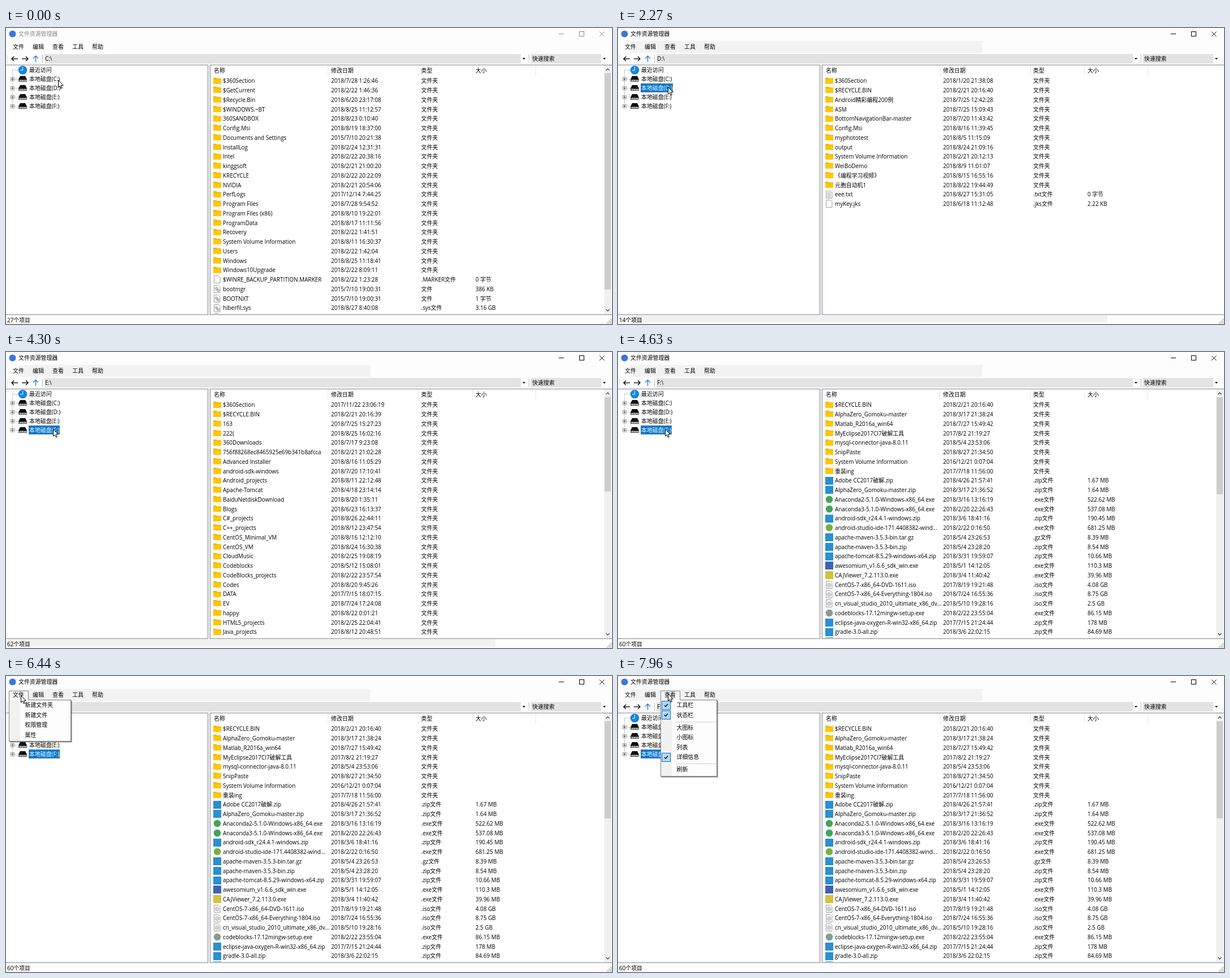
An HTML page with a canvas for the animation above (8000 ms loop, 1070x524 px).

```html
<!DOCTYPE html>
<html lang="zh-CN">
<head>
<meta charset="utf-8">
<title>文件资源管理器</title>
<style>
html, body { margin: 0; width: 100%; height: 100%; overflow: hidden; background: #fdfdfd; }
canvas { display: block; }
</style>
</head>
<body>
<canvas id="stage" width="1070" height="524"></canvas>
<script>
const g = document.getElementById('stage').getContext('2d');
const LOOP = 8000, ROW = 16.75, BLUE = '#0078d7', HOVER = '#b3d7f3';

// Each row: name|date for folders, name|date|extension|size|icon for files
const parse = text => text.trim().split('\n').map(row => row.split('|'));
const DRIVES = {
  C: { count: 27, thumb: 383, rows: parse(`
$360Section|2018/7/28 1:26:46
$GetCurrent|2018/2/22 1:46:36
$Recycle.Bin|2018/6/20 23:17:08
$WINDOWS.~BT|2018/8/25 11:12:57
360SANDBOX|2018/8/23 0:10:40
Config.Msi|2018/8/19 18:37:00
Documents and Settings|2015/7/10 20:21:38
InstallLog|2018/2/24 12:31:31
Intel|2018/2/22 20:38:16
kinggsoft|2018/2/21 21:00:20
KRECYCLE|2018/2/22 20:22:09
NVIDIA|2018/2/21 20:54:06
PerfLogs|2017/12/14 7:44:25
Program Files|2018/7/28 9:54:52
Program Files (x86)|2018/8/10 19:22:01
ProgramData|2018/8/17 11:11:56
Recovery|2018/2/22 1:41:51
System Volume Information|2018/8/11 16:30:37
Users|2018/2/22 1:42:04
Windows|2018/8/25 11:18:41
Windows10Upgrade|2018/2/22 8:09:11
$WINRE_BACKUP_PARTITION.MARKER|2018/2/22 1:23:28|.MARKER|0 字节|page
bootmgr|2015/7/10 19:00:31||386 KB|gear
BOOTNXT|2015/7/10 19:00:31||1 字节|gear
hiberfil.sys|2018/8/27 8:40:08|.sys|3.16 GB|gear
||||gear`) },
  D: { count: 14, thumb: 0, rows: parse(`
$360Section|2018/1/20 21:38:08
$RECYCLE.BIN|2018/2/21 20:16:40
Android精彩编程200例|2018/7/25 12:42:28
ASM|2018/7/25 15:09:43
BottomNavigationBar-master|2018/7/20 11:43:42
Config.Msi|2018/8/16 11:39:45
myphototest|2018/8/5 11:15:09
output|2018/8/24 21:09:16
System Volume Information|2018/2/21 20:12:13
WeiBoDemo|2018/8/9 11:01:07
《编程学习视频》|2018/8/15 16:55:16
元胞自动机1|2018/8/22 19:44:49
eee.txt|2018/8/27 15:31:05|.txt|0 字节|text
myKey.jks|2018/6/18 11:12:48|.jks|2.22 KB|page`) },
  E: { count: 62, thumb: 167, rows: parse(`
$360Section|2017/11/22 23:06:19
$RECYCLE.BIN|2018/2/21 20:16:39
163|2018/7/25 15:27:23
222(|2018/8/25 16:02:16
360Downloads|2018/7/17 9:23:08
756f88268ec8465925e69b341b8afcca|2018/2/21 21:02:28
Advanced Installer|2018/8/16 11:05:29
android-sdk-windows|2018/7/20 17:10:41
Android_projects|2018/8/11 22:12:48
Apache-Tomcat|2018/4/18 23:14:14
BaiduNetdiskDownload|2018/8/20 1:35:11
Blogs|2018/6/23 16:13:37
C#_projects|2018/8/26 22:44:11
C++_projects|2018/8/12 23:47:54
CentOS_Minimal_VM|2018/8/16 12:12:10
CentOS_VM|2018/8/24 16:30:38
CloudMusic|2018/2/25 19:08:19
Codeblocks|2018/5/12 15:08:01
CodeBlocks_projects|2018/2/22 23:57:54
Codes|2018/8/20 9:45:26
DATA|2017/7/15 18:07:15
EV|2018/7/24 17:24:08
happy|2018/8/22 0:01:21
HTML5_projects|2018/2/25 22:04:41
Java_projects|2018/8/12 20:48:51`) },
  F: { count: 60, thumb: 172, rows: parse(`
$RECYCLE.BIN|2018/2/21 20:16:40
AlphaZero_Gomoku-master|2018/3/17 21:38:24
Matlab_R2016a_win64|2018/7/27 15:49:42
MyEclipse2017CI7破解工具|2017/8/2 21:19:27
mysql-connector-java-8.0.11|2018/5/4 23:53:06
SnipPaste|2018/8/27 21:34:50
System Volume Information|2016/12/21 0:07:04
重装ing|2017/7/18 11:56:00
Adobe CC2017破解.zip|2018/4/26 21:57:41|.zip|1.67 MB|zip
AlphaZero_Gomoku-master.zip|2018/3/17 21:36:52|.zip|1.64 MB|zip
Anaconda2-5.1.0-Windows-x86_64.exe|2018/3/16 13:16:19|.exe|522.62 MB|green
Anaconda3-5.1.0-Windows-x86_64.exe|2018/2/20 22:26:43|.exe|537.08 MB|green
android-sdk_r24.4.1-windows.zip|2018/3/6 18:41:16|.zip|190.45 MB|zip
android-studio-ide-171.4408382-wind...|2018/2/22 0:16:50|.exe|681.25 MB|lime
apache-maven-3.5.3-bin.tar.gz|2018/5/4 23:26:53|.gz|8.39 MB|zip
apache-maven-3.5.3-bin.zip|2018/5/4 23:28:20|.zip|8.54 MB|zip
apache-tomcat-8.5.29-windows-x64.zip|2018/3/31 19:59:07|.zip|10.66 MB|zip
awesomium_v1.6.6_sdk_win.exe|2018/5/1 14:12:05|.exe|110.3 MB|navy
CAJViewer_7.2.113.0.exe|2018/3/4 11:40:42|.exe|39.96 MB|yellow
CentOS-7-x86_64-DVD-1611.iso|2017/8/19 19:21:48|.iso|4.08 GB|disc
CentOS-7-x86_64-Everything-1804.iso|2018/7/24 16:55:36|.iso|8.75 GB|disc
cn_visual_studio_2010_ultimate_x86_dv...|2018/5/10 19:28:16|.iso|2.5 GB|disc
codeblocks-17.12mingw-setup.exe|2018/2/22 23:55:04|.exe|86.15 MB|gray
eclipse-java-oxygen-R-win32-x86_64.zip|2017/7/15 21:24:44|.zip|178 MB|zip
gradle-3.0-all.zip|2018/3/6 22:02:15|.zip|84.69 MB|zip
||||zip`) }
};
const SQUARES = { zip: '#2b8fd0', navy: '#3c62b4', yellow: '#d2c23c' };
const DISCS = { green: '#45a35a', lime: '#78b043', gray: '#8b9992' };

const TOP_MENU = ['文件', '编辑', '查看', '工具', '帮助'];
const POPUPS = [
  { x: 5, w: 110, h: 74, items: ['新建文件夹', '新建文件', '权限管理', '属性'] },
  { x: 40, w: 81, h: 74, items: ['复制', '粘贴', '剪切', '删除'] },
  { x: 75, w: 100, h: 136, checks: [0, 1, 6],
    items: ['工具栏', '状态栏', '-', '大图标', '小图标', '列表', '详细信息', '-', '刷新'] }
];

// Pointer path: time, x, y
const PATH = [
  [0, 92, 92], [30, 92, 92], [90, 94, 92], [240, 94, 92], [300, 95, 93],
  [640, 95, 93], [700, 91, 92], [1260, 91, 92], [1450, 89, 98], [1640, 92, 104],
  [1880, 92, 104], [2000, 88, 104], [2550, 88, 104], [3220, 84, 121],
  [3590, 84, 121], [4270, 83, 136], [4830, 83, 136], [5320, 34, 47],
  [5430, 34, 47], [5620, 27, 34], [6440, 26, 34], [6830, 61, 30],
  [7080, 61, 30], [7200, 60, 29], [7570, 60, 29], [7810, 88, 32],
  [7950, 88, 32], [7960, 88, 31]
];
const SELECTED = [[0, ''], [640, 'C'], [2150, 'D'], [3260, 'E'], [4300, 'F']];
const ADDRESS = [[0, 'C'], [2180, 'D'], [3380, 'E'], [4580, 'F']];
const LISTED = [[0, 'C'], [2180, ''], [2240, 'D'], [3350, ''], [3380, 'E'], [4550, ''], [4600, 'F']];
const SCROLLER = [[0, 'C'], [2240, 'D'], [3350, 'E'], [4580, 'F']];

const at = (steps, t) => steps.filter(s => s[0] <= t).pop()[1];
const clamp = v => Math.max(0, Math.min(1, v));

function pointer(t) {
  const i = PATH.findIndex(p => p[0] > t);
  if (i < 0) return PATH[PATH.length - 1].slice(1);
  const [t0, x0, y0] = PATH[i - 1], [t1, x1, y1] = PATH[i];
  const u = (t - t0) / (t1 - t0), k = u * u * (3 - 2 * u);
  return [Math.round(x0 + (x1 - x0) * k), Math.round(y0 + (y1 - y0) * k)];
}

function box(x, y, w, h, fill, stroke) {
  if (fill) { g.fillStyle = fill; g.fillRect(x, y, w, h); }
  if (stroke) { g.strokeStyle = stroke; g.lineWidth = 1; g.strokeRect(x + .5, y + .5, w - 1, h - 1); }
}

function shape(points, fill, stroke, width = 1) {
  g.beginPath();
  for (let i = 0; i < points.length; i += 2) g.lineTo(points[i], points[i + 1]);
  if (fill) { g.closePath(); g.fillStyle = fill; g.fill(); }
  if (stroke) { g.strokeStyle = stroke; g.lineWidth = width; g.stroke(); }
}

function disc(x, y, r, fill, stroke) {
  g.beginPath();
  g.arc(x, y, r, 0, 7);
  if (fill) { g.fillStyle = fill; g.fill(); }
  if (stroke) { g.strokeStyle = stroke; g.lineWidth = 1; g.stroke(); }
}

function label(text, x, y, color = '#000') {
  g.fillStyle = color;
  g.fillText(text, x, y + 3.6);
}

function titleBar(active) {
  const ink = active ? '#000' : '#888';
  disc(11.5, 10.5, 6, '#3a78d8');
  label('文件资源管理器', 22, 10.5, ink);
  shape([976, 10.5, 985, 10.5], null, ink);
  box(1012, 6, 9, 9, null, ink);
  shape([1048, 6.5, 1056.5, 15], null, ink);
  shape([1056.5, 6.5, 1048, 15], null, ink);
}

function toolBar(drive, hoverNext) {
  for (let y = 49; y < 62; y += 3) box(2, y, 1, 1, '#aaa');
  if (hoverNext) box(25, 45, 18, 18, HOVER, BLUE);
  shape([21, 54.5, 10, 54.5], null, '#000', 1.3);
  shape([14, 50.5, 10, 54.5, 14, 58.5], null, '#000', 1.3);
  shape([28, 54.5, 39, 54.5], null, '#000', 1.3);
  shape([35, 50.5, 39, 54.5, 35, 58.5], null, '#000', 1.3);
  shape([52.5, 60, 52.5, 49.5], null, '#1a73e8', 1.3);
  shape([48, 54, 52.5, 49.5, 57, 54], null, '#1a73e8', 1.3);
  box(64, 47, 1, 15, '#bbb');
  box(923, 47, 1, 15, '#bbb');
  box(68, 46, 841, 17, '#e3e3e3');
  box(927, 46, 124, 17, '#e3e3e3');
  label(drive + ':\\', 69, 54.5);
  label('快速搜索', 929, 54.5);
  for (const x of [914.5, 1056.5]) shape([x - 2.5, 53, x + 2.5, 53, x, 56], '#000');
}

function tree(selected) {
  box(-1, 65, 358, 443, '#fff', '#828790');
  g.setLineDash([1, 1]);
  shape([11.5, 74, 11.5, 138], null, '#999');
  shape([12, 74.5, 21, 74.5], null, '#999');
  for (let i = 0; i < 4; i++) shape([12, 90.5 + i * 16, 22, 90.5 + i * 16], null, '#999');
  g.setLineDash([]);
  disc(29.5, 74.5, 7.8, '#1585e0');
  shape([29.5, 69, 29.5, 75, 25, 75], null, '#fff');
  label('最近访问', 41, 74);
  [...'CDEF'].forEach((drive, i) => {
    const y = 90 + i * 16, text = `本地磁盘(${drive}:)`;
    box(8, y - 3, 7, 7, '#fff', '#999');
    shape([9.5, y + .5, 13.5, y + .5], null, '#333');
    shape([11.5, y - 1.5, 11.5, y + 2.5], null, '#333');
    shape([25, y - 5, 34, y - 5, 37, y + 1, 22, y + 1], '#111');
    box(22, y + 1, 15, 4, '#eee', '#444');
    for (let x = 24; x < 36; x += 3) box(x, y + 2, 1, 2, '#333');
    const on = drive === selected;
    if (on) {
      const w = Math.round(g.measureText(text).width) + 2;
      box(40, y - 8, w, 16, BLUE);
      g.setLineDash([1, 1]);
      box(40, y - 8, w, 16, null, '#e07820');
      g.setLineDash([]);
    }
    label(text, 41, y, on ? '#fff' : '#000');
  });
}

function icon(kind, y) {
  if (!kind) {
    box(366, y - 6, 6, 2, '#e0a000');
    box(366, y - 5, 14, 10, '#ffc60a');
    box(366, y - 4, 14, 1, '#f2b800');
  } else if (SQUARES[kind]) {
    box(366, y - 7, 14, 14, SQUARES[kind]);
  } else if (DISCS[kind]) {
    disc(373, y, 6.3, DISCS[kind]);
  } else {
    shape([367.5, y - 6.5, 375, y - 6.5, 378, y - 3.5, 378, y + 6.5, 367.5, y + 6.5, 367.5, y - 6.5], '#fcfcfc', '#a0a0a0');
    if (kind === 'text') for (let k = -4; k < 6; k += 2) box(369, y + k, 7, 1, '#b0b0b0');
    if (kind === 'gear') { disc(371.5, y - 1, 2, '#ddd', '#888'); disc(374.5, y + 2.5, 2, '#ddd', '#888'); }
    if (kind === 'disc') { disc(372.7, y + .5, 3.4, '#e4e4e4', '#aaa'); disc(372.7, y + .5, 1, '#fff', '#aaa'); }
  }
}

function fileList(drive, thumb) {
  box(360, 65, 711, 443, '#fff', '#828790');
  ['名称', '修改日期', '类型', '大小'].forEach((s, i) => label(s, [367, 574, 733, 829][i], 75.5));
  for (const x of [568, 728, 823, 935]) box(x, 66, 1, 19, '#e5e5e5');
  g.save();
  g.beginPath();
  g.rect(361, 66, 708, 440);
  g.clip();
  if (drive) DRIVES[drive].rows.forEach(([name, date, ext, size, kind], i) => {
    const y = 93.7 + i * ROW;
    icon(kind, Math.round(y));
    label(name, 383, y);
    label(date, 574, y);
    label(kind ? ext + '文件' : '文件夹', 733, y);
    if (size) label(size, 829, y);
  });
  g.restore();
  if (thumb) {
    box(1056, 66, 13, 441, '#f0f0f0');
    box(1057, 80, 11, thumb, '#cdcdcd');
    shape([1059.5, 75, 1062.5, 72, 1065.5, 75], null, '#505050', 1.4);
    shape([1059.5, 498, 1062.5, 501, 1065.5, 498], null, '#505050', 1.4);
  }
}

function statusBar(drive, shaded) {
  if (shaded) box(2, 509, 862, 12, '#f1f1f1');
  label(DRIVES[drive].count + '个项目', 2, 517);
  for (let i = 0; i < 3; i++)
    for (let j = 0; j <= i; j++) box(1067 - j * 3, 515 + i * 3, 2, 2, '#b0b0b0');
}

function tooltip(alpha) {
  if (!alpha) return;
  g.globalAlpha = alpha;
  box(37, 78, 86, 17, 'rgba(0,0,0,.15)');
  box(36, 76, 85, 17, '#fff', '#999');
  label('toolStripButton1', 40, 84.5, '#666');
  g.globalAlpha = 1;
}

function popup({ x, w, h, items, checks = [] }) {
  box(x + 2, 44, w, h, 'rgba(0,0,0,.2)');
  box(x + 1, 43, w, h, 'rgba(0,0,0,.35)');
  box(x, 42, w, h, '#fdfdfd', '#808080');
  box(x + 1, 43, 19, h - 2, '#f1f1f1');
  box(x, 26, 35, 17, '#f6f6f6');
  shape([x + .5, 43, x + .5, 26.5, x + 34.5, 26.5, x + 34.5, 42.5], null, '#808080');
  let y = 51.5;
  items.forEach((item, i) => {
    if (item === '-') {
      box(x + 27, Math.round(y - 5.7), w - 29, 1, '#d0d0d0');
      y += 4.6;
      return;
    }
    if (checks.includes(i)) {
      const top = Math.round(y - 8);
      box(x + 2, top, 16, 16, HOVER, BLUE);
      shape([x + 7, top + 8, x + 9.2, top + 10.2, x + 13, top + 5.5], null, '#000', 1.4);
    }
    label(item, x + 28.5, y);
    y += 17.5;
  });
}

function drawPointer(x, y) {
  g.save();
  g.translate(x + .5, y + .5);
  g.lineJoin = 'round';
  shape([0, 0, 0, 12.5, 2.8, 10, 4.8, 14.6, 6.8, 13.8, 4.9, 9.2, 8.6, 9.2, 0, 0], '#fff', '#000');
  g.restore();
}

function draw(t) {
  const [x, y] = pointer(t), active = t >= 640;
  const open = t < 5650 ? -1 : x < 40 ? 0 : x < 75 ? 1 : 2;
  const drive = at(ADDRESS, t);
  box(0, 0, 1070, 524, '#fdfdfd');
  titleBar(active);
  if (active) box(22, 23, 621, 21, '#f2f2f2');
  if (open < 0 && x < 40 && y >= 26 && y < 43) box(5, 26, 35, 17, HOVER, BLUE);
  toolBar(drive, x >= 25 && x < 43 && y >= 45 && y < 63);
  box(357, 65, 3, 443, '#f0f0f0');
  tree(at(SELECTED, t));
  fileList(at(LISTED, t), DRIVES[at(SCROLLER, t)].thumb);
  statusBar(drive, t >= 2180 && t < 4580);
  tooltip(Math.min(clamp((t - 5320) / 120), clamp((5740 - t) / 90)));
  if (open >= 0) popup(POPUPS[open]);
  TOP_MENU.forEach((s, i) => label(s, 12 + i * 35, 33.5));
  drawPointer(x, y);
}

g.font = '9.9px "Open Sans", "Noto Sans CJK SC", "Noto Sans CJK", sans-serif';
function tick() {
  draw(performance.now() % LOOP);
  requestAnimationFrame(tick);
}
tick();
</script>
</body>
</html>
```
